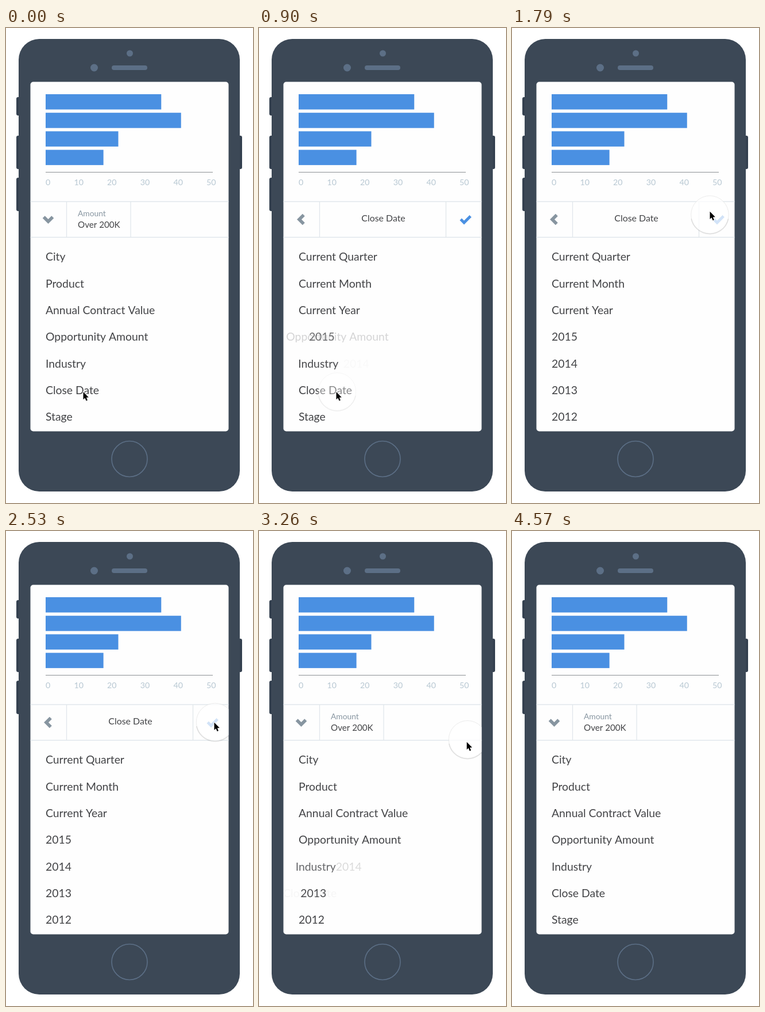
Write an HTML page with a canvas that moves like this. It is 430x825 px and loops after 4870 ms.

```html
<!DOCTYPE html>
<html lang="en">
<head>
<meta charset="utf-8">
<title>Filter list on a phone</title>
<style>
html, body { margin: 0; width: 100%; height: 100%; overflow: hidden; background: #fff; }
canvas { display: block; }
</style>
</head>
<body>
<canvas id="stage" width="430" height="825"></canvas>
<script>
const ctx = document.getElementById('stage').getContext('2d');
const LOOP = 4870, HOLD = 450, STEP = 3100 / 21;
const FONT = 'Lato, "Open Sans", sans-serif';
const BODY = '#3c4856', TRIM = '#5c6f86', BLUE = '#4a90e2';
const INK = '#434447', GREY = '#8795a0', PALE = '#b7c7d2', RULE = '#e0e6eb';

const FIELDS = ['City', 'Product', 'Annual Contract Value', 'Opportunity Amount', 'Industry', 'Close Date', 'Stage'];
const DATES = ['Current Quarter', 'Current Month', 'Current Year', '2015', '2014', '2013', '2012'];

// Pointer path: time, x, y
const PATH = [
  [1340, 136, 631.5], [1490, 256, 531], [1640, 325, 394], [1790, 345, 322], [1940, 363, 319],
  [2530, 364, 332], [3110, 361, 334], [3260, 363, 360], [3550, 369, 711]
];

const clamp = v => Math.min(1, Math.max(0, v));
const inOut = p => p < .5 ? 2 * p * p : 1 - 2 * (1 - p) ** 2;
const out = p => 1 - (1 - p) ** 2;
const run = (t, start, span, ease = inOut) => ease(clamp((t - start) / span));

// A first hold, then even steps
const stepped = t => t < HOLD ? 0 : HOLD + 7 + STEP * Math.floor((t - HOLD + 3) / STEP);

function along(t) {
  let [, x, y] = PATH[0];
  for (let i = 1; i < PATH.length; i++) {
    const [t0, x0, y0] = PATH[i - 1], [t1, x1, y1] = PATH[i];
    const p = clamp((t - t0) / (t1 - t0));
    x += (x1 - x0) * p;
    y += (y1 - y0) * p;
  }
  return [x, y];
}

function faded(alpha, draw) {
  if (alpha <= 0) return;
  ctx.save();
  ctx.globalAlpha = alpha;
  draw();
  ctx.restore();
}

function box(x, y, w, h, r, color) {
  ctx.fillStyle = color;
  ctx.beginPath();
  ctx.roundRect(x, y, w, h, r);
  ctx.fill();
}

function disc(x, y, r, color) {
  ctx.fillStyle = color;
  ctx.beginPath();
  ctx.arc(x, y, r, 0, Math.PI * 2);
  ctx.fill();
}

function ring(x, y, r, color, width, from = 0, to = Math.PI * 2) {
  ctx.strokeStyle = color;
  ctx.lineWidth = width;
  ctx.beginPath();
  ctx.arc(x, y, r, from, to);
  ctx.stroke();
}

function line(points, color, width) {
  ctx.strokeStyle = color;
  ctx.lineWidth = width;
  ctx.beginPath();
  points.forEach(([x, y]) => ctx.lineTo(x, y));
  ctx.stroke();
}

function text(str, x, y, size, color, align = 'left') {
  ctx.font = `${size}px ${FONT}`;
  ctx.fillStyle = color;
  ctx.textAlign = align;
  ctx.fillText(str, x, y);
  return ctx.measureText(str).width;
}

function phone() {
  for (const [x, y, h] of [[18, 120, 32], [18, 187, 58], [18, 260, 58], [403, 187, 58]])
    box(x, y, 8, h, 3, '#354150');
  box(22, 19, 385, 786, 36, BODY);
  disc(215.5, 44, 5.5, TRIM);
  disc(153.5, 69, 6.5, TRIM);
  box(184, 65, 62, 8, 4, TRIM);
  ring(215, 748.5, 31, TRIM, 1.6);
}

function chart() {
  [35, 41, 22, 17.5].forEach((value, i) => {
    ctx.fillStyle = BLUE;
    ctx.fillRect(69, 115 + 32.2 * i, value * 5.75, 26.5);
  });
  line([[69, 250.5], [360, 250.5]], '#8d9194', 1);
  for (let n = 0, x = 69; n <= 50; n += 10) x += 41.2 + text(n, x, 273, 14.2, PALE);
}

function divider(x) {
  line([[x, 302], [x, 363]], RULE, 1.3);
}

function header(t) {
  line([[42, 301.5], [388, 301.5]], RULE, 1.3);
  line([[42, 363.5], [388, 363.5]], RULE, 1.3);
  divider(105.5);

  const cell = run(t, 506, 160) - run(t, 2830, 130);
  const title = run(t, 506, 240) - run(t, 2880, 200);
  const tick = run(t, 540, 250) - run(t, 2690, 200);
  const turn = run(t, 506, 300, out) - run(t, 2830, 300, out);

  ctx.save();
  ctx.translate(73.5, 332.5);
  ctx.rotate(turn * Math.PI / 2);
  line([[-7.8, -4.3], [0, 3.5], [7.8, -4.3]], GREY, 5.6);
  ctx.restore();

  faded(1 - cell, () => {
    divider(217);
    text('Amount', 125, 327, 13.8, GREY);
    text('Over 200K', 125, 346.5, 15.2, INK);
  });
  faded(cell, () => divider(325.5));
  faded(title, () => text('Close Date', 216.5 + 45 * (1 - title), 335.5, 15.9, INK, 'center'));
  faded(tick, () => line([[351.2, 332.3], [357, 338], [368.2, 326.8]], BLUE, 4.8));
}

function list(t) {
  FIELDS.forEach((field, i) => {
    const y = 404.3 + 46.35 * i, delay = 82 * i;
    const e = run(t, 554 + delay, 150) - run(t, 2830 + delay, 150);
    faded(1 - e, () => text(field, 69 - 28 * e, y, 19.35, INK));
    faded(e, () => text(DATES[i], 69 + 80 * (1 - e), y, 19.35, INK));
  });
}

function arrow(x, y) {
  ctx.save();
  ctx.translate(x, y);
  ctx.beginPath();
  for (const [px, py] of [[.5, 0], [.5, 13.2], [3.4, 10.5], [5.6, 15.4], [7.9, 14.4], [5.8, 9.7], [9.8, 9.5]])
    ctx.lineTo(px, py);
  ctx.closePath();
  ctx.lineJoin = 'round';
  ctx.strokeStyle = '#fff';
  ctx.lineWidth = 2;
  ctx.stroke();
  ctx.fillStyle = '#000';
  ctx.fill();
  ctx.restore();
}

function pointer(t) {
  const [x, y] = along(t), [px, py] = along(t - 12);
  const press = run(t, 380, 150) - run(t, 650, 500);
  const drag = run(t, 1400, 180);
  const leave = run(t, 3350, 180);
  const trace = .35 * run(t, 4400, 150);
  const r = 33 + 44 * drag * (1 - drag);

  faded(press + drag - leave + trace, () => {
    disc(x, y, r, 'rgba(255,255,255,.75)');
    ring(x, y, r - .3, 'rgba(0,0,0,.08)', 1);
    ring(x, y + .6, r, 'rgba(0,0,0,.1)', 1.5, .2, Math.PI - .2);
  });
  // The arrow runs slightly ahead of the spot
  arrow(2 * x - px - 2, 2 * y - py + .5);
}

function draw(t) {
  ctx.fillStyle = '#fff';
  ctx.fillRect(0, 0, 430, 825);
  phone();
  ctx.save();
  box(42.5, 93.5, 345, 607, 5, '#fefefe');
  ctx.clip();
  chart();
  header(t);
  list(t);
  pointer(t);
  ctx.restore();
}

function frame() {
  draw(stepped(performance.now() % LOOP));
  requestAnimationFrame(frame);
}
frame();
</script>
</body>
</html>
```
